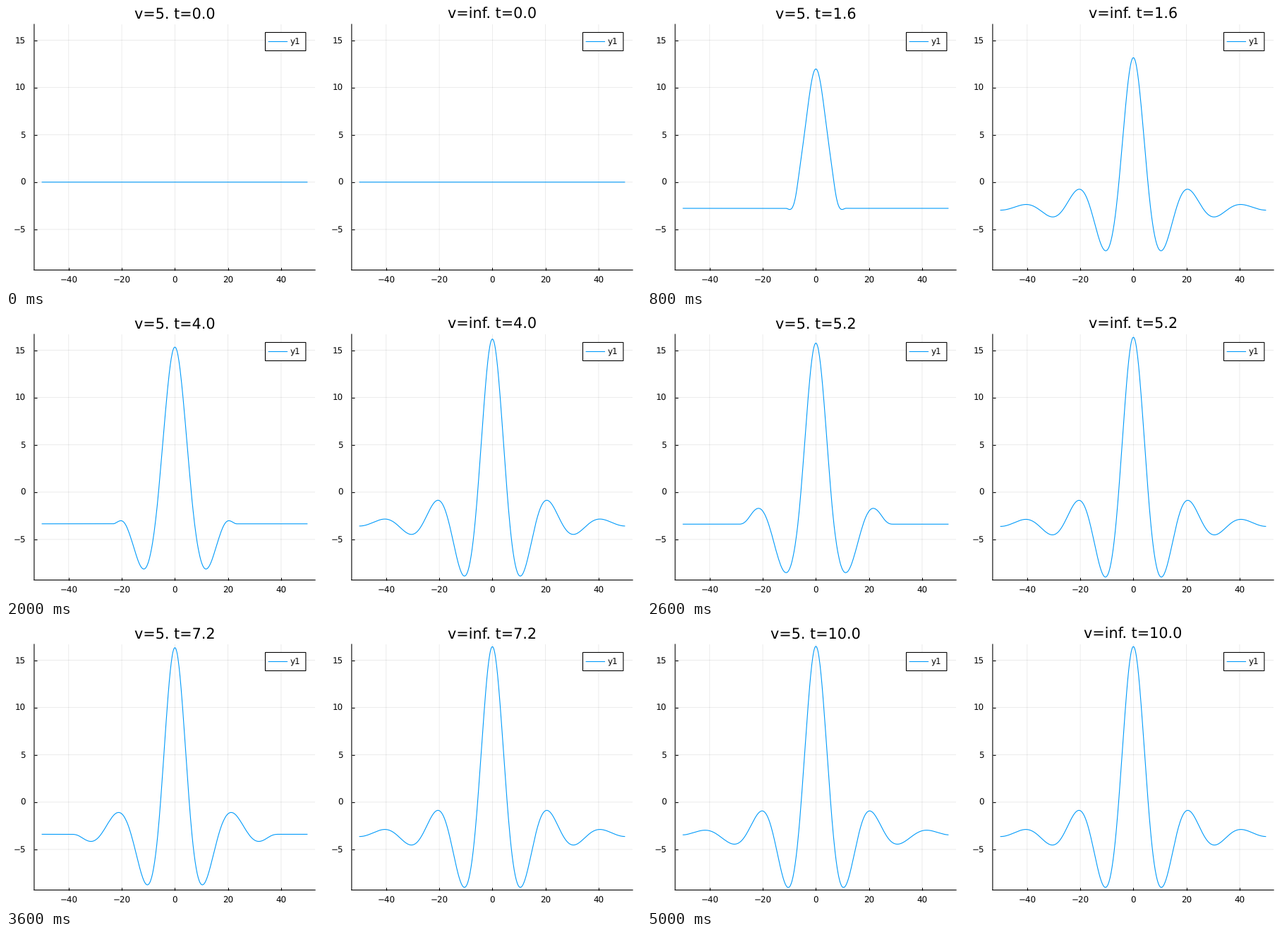
These frames come from a looping animation (900 px wide and 400 px high, 5100 ms). A matplotlib script:

```python
import matplotlib.pyplot as plt
import numpy as np
from matplotlib.animation import FuncAnimation
from matplotlib.lines import Line2D
from matplotlib.patches import Rectangle

W, H, DPI = 900, 400, 100
PX = 72 / DPI                  # points per pixel
BLUE = "#009afa"
SMALL, BIG = 11.86 * PX, 20.75 * PX

# Neural field on a ring, explicit Euler steps
L, N = 100, 512
DT, STEPS, STRIDE = 0.1, 100, 2
DX = L / N
x = -L / 2 + DX * np.arange(N)

plt.rcParams.update({
    "font.family": "DejaVu Sans",
    "path.snap": False,
    "text.hinting": "none",
})


def kernel(r):
    k = np.pi / 10
    return 2 * np.exp(-0.08 * r) * (0.08 * np.sin(k * r) + np.cos(k * r))


def solve(speed):
    """Field at every step, with axonal delay |x| / speed."""
    r = np.abs(x)
    delay = np.floor(r / (speed * DT)).astype(int)
    rings = np.array([np.where(delay == d, kernel(r), 0)
                      for d in range(delay.max() + 1)])
    rings = np.fft.fft(np.fft.ifftshift(rings, axes=1), axis=1) * DX
    drive = -3.39967 + 8 * np.exp(-x**2 / 18)

    u = np.zeros((STEPS + 1, N))
    fired = np.zeros((STEPS, N), complex)
    for n in range(STEPS):
        fired[n] = np.fft.fft((u[n] > 0.005).astype(float))
        m = min(n + 1, len(rings))
        past = fired[n - m + 1:n + 1][::-1]
        syn = np.fft.ifft((rings[:m] * past).sum(axis=0)).real
        u[n + 1] = u[n] + DT * (drive + syn - u[n])
    return u


fig = plt.figure(figsize=(W / DPI, H / DPI), dpi=DPI, facecolor="white")


def label(px, py, text, size=SMALL, ha="center"):
    return fig.text(px / W, 1 - py / H, text, fontsize=size,
                    ha=ha, va="baseline", color="black")


def legend(left):
    place = dict(transform=fig.transFigure)
    fig.add_artist(Rectangle((left / W, 1 - 63.5 / H), 57.4 / W, 26 / H,
                             fc="white", ec="black", lw=1.1 * PX,
                             zorder=5, **place))
    fig.add_artist(Line2D([(left + 4.7) / W, (left + 31) / W],
                          [1 - 50.5 / H] * 2, color=BLUE, lw=1.1 * PX,
                          zorder=6, **place))
    label(left + 35.3, 54.7, "y1", ha="left").set_zorder(6)


def panel(shift):
    left, top, width, height = 39.9 + shift, 26, 398.2, 348.5
    ax = fig.add_axes([left / W, 1 - (top + height) / H,
                       width / W, height / H])
    ax.set_xlim(-52.994, 52.799)
    ax.set_ylim(-9.29, 16.68)
    xticks, yticks = range(-40, 41, 20), range(-5, 16, 5)
    ax.set_xticks(xticks)
    ax.set_yticks(yticks)
    ax.tick_params(direction="in", length=4.2 * PX, width=1.1 * PX,
                   labelbottom=False, labelleft=False)
    ax.grid(color="black", alpha=0.1, lw=0.75 * PX)
    ax.set_axisbelow(True)
    ax.spines[["top", "right"]].set_visible(False)
    ax.spines[["left", "bottom"]].set_linewidth(1.1 * PX)

    for v in xticks:
        px = ax.transData.transform((v, 0))[0]
        label(px, 392.4, str(v).replace("-", "\u2212"))
    for v in yticks:
        py = H - ax.transData.transform((0, v))[1]
        label(28 + shift, py + 4.3, str(v).replace("-", "\u2212"), ha="right")

    legend(367.5 + shift)
    line, = ax.plot(x, 0 * x, color=BLUE, lw=1.1 * PX, zorder=3)
    title = label(left + width / 2, 18, "", BIG)
    return line, title


panels = [(*panel(shift), name, solve(speed))
          for shift, name, speed in ((0, "5", 5.0), (450, "inf", np.inf))]


def draw(i):
    n = i * STRIDE
    for line, title, name, u in panels:
        line.set_ydata(u[n])
        title.set_text(f"v={name}. t={n * DT:.1f}")
    return [artist for p in panels for artist in p[:2]]


anim = FuncAnimation(fig, draw, frames=STEPS // STRIDE + 1, interval=100,
                     repeat=True, repeat_delay=0, blit=False)
plt.show()
```
